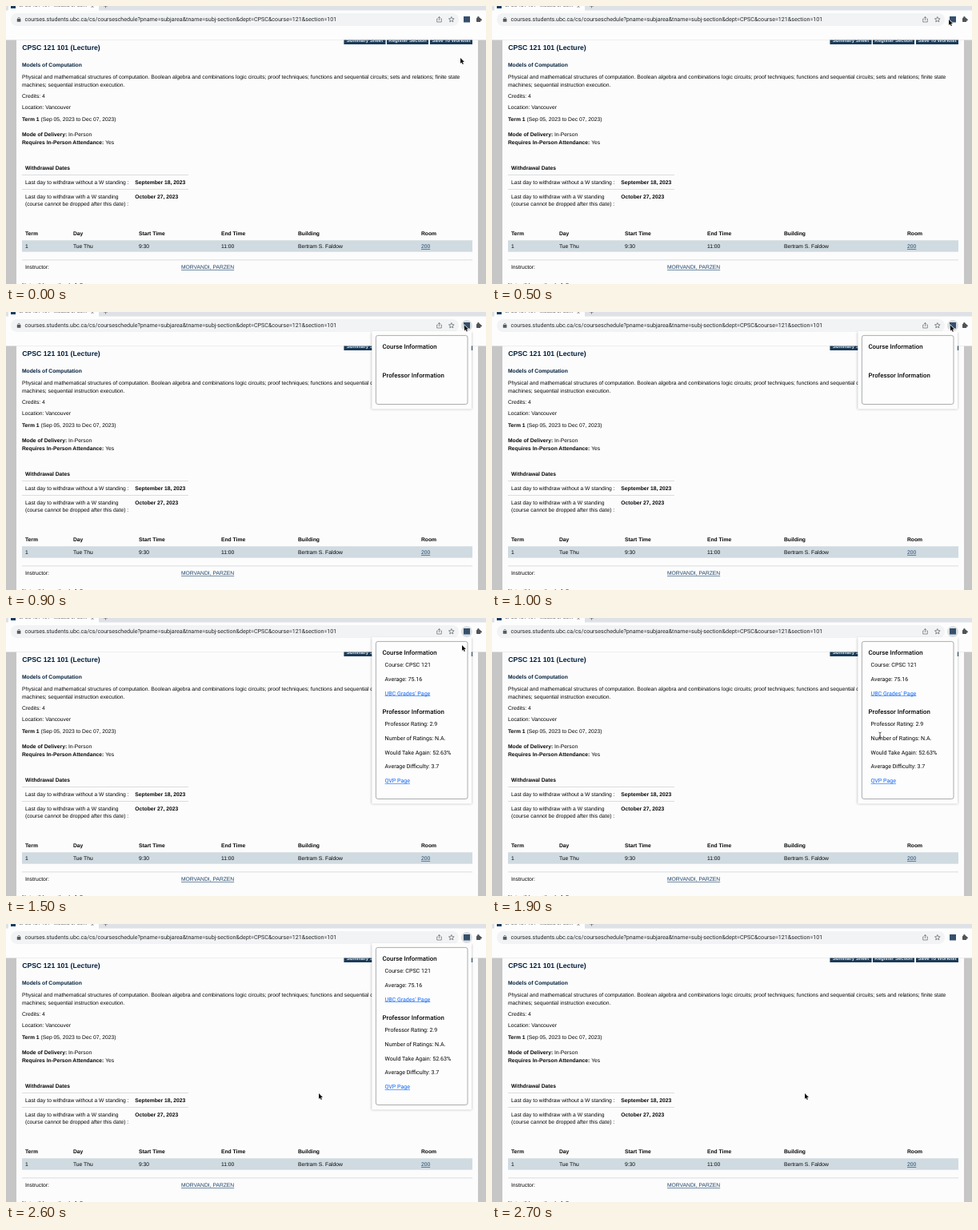
Write an HTML page with a canvas that moves like this. It is 600x348 px and loops after 2.8 s.

```html
<!DOCTYPE html>
<html lang="en">
<head>
<meta charset="utf-8">
<title>Course page helper</title>
<style>
  html, body { margin: 0; width: 100%; height: 100%; overflow: hidden; background: #fff; }
  canvas { display: block; width: 600px; height: 348px; }
</style>
</head>
<body>
<canvas id="stage" width="600" height="348"></canvas>
<script>
const ctx = document.getElementById('stage').getContext('2d');
ctx.textRendering = 'geometricPrecision';

const LOOP = 2800, STEP = 100;
const OPEN = 800, LOADED = 1100, CLOSED = 2700;
const PAGE = '"Liberation Sans", Arial, sans-serif';
const UI = 'Roboto, sans-serif';
const BODY = `6.74px ${PAGE}`;
const BOLD = `bold ${BODY}`;
const INK = '#050607', NAVY = '#001f3d', LINK = '#1b436a';

// time, x, y of the pointer tip
const path = [
  [0, 568, 65], [100, 568, 64], [300, 570, 38], [500, 571, 17], [600, 573, 16],
  [1300, 573, 17], [1500, 570, 34], [1700, 525, 105], [1800, 497, 137],
  [1900, 485, 147], [2300, 472, 172], [2400, 472, 172], [2600, 391, 212], [2800, 391, 212]
];

function rect(x, y, w, h, color) {
  ctx.fillStyle = color;
  ctx.fillRect(x, y, w, h);
}

function round(x, y, w, h, r, fill, stroke) {
  ctx.beginPath();
  ctx.roundRect(x, y, w, h, r);
  if (fill) { ctx.fillStyle = fill; ctx.fill(); }
  if (stroke) { ctx.strokeStyle = stroke; ctx.stroke(); }
}

function text(str, x, y, font = BODY, color = INK) {
  ctx.font = font;
  ctx.fillStyle = color;
  ctx.fillText(str, x, y);
  return x + ctx.measureText(str).width;
}

function link(str, x, y, font, color) {
  const end = text(str, x, y, font, color);
  rect(x, y + 0.8, end - x, 0.6, color);
}

function labelled(label, value, x, y) {
  text(value, text(label + ' ', x, y, BOLD), y);
}

function stroke(points, color, width, closed) {
  ctx.beginPath();
  points.forEach(([x, y]) => ctx.lineTo(x, y));
  if (closed) ctx.closePath();
  ctx.strokeStyle = color;
  ctx.lineWidth = width;
  ctx.stroke();
}

function drawBrowser(open) {
  rect(0, 0, 600, 43, '#fdfdfd');
  rect(116, 0, 484, 5.5, '#dee1e6');
  rect(0, 0, 3, 5.5, '#dee1e6');
  rect(6, 0, 6, 3, '#1c3d60');
  text('CPSC 121 101 - Models of Com', 16, 1.4, `6.1px ${UI}`, '#55595d');
  stroke([[106.5, -1], [109.5, 2]], '#666', 0.7);
  stroke([[109.5, -1], [106.5, 2]], '#666', 0.7);
  stroke([[122, 0], [127, 0]], '#666', 0.8);
  stroke([[124.5, -2], [124.5, 2.5]], '#666', 0.8);

  round(6, 9, 560, 16, 8, '#f1f3f4');
  round(13.8, 16, 4.6, 3.8, 0.6, '#55595d');
  ctx.beginPath();
  ctx.arc(16.1, 15.8, 1.4, Math.PI, 0);
  ctx.strokeStyle = '#55595d';
  ctx.lineWidth = 0.7;
  ctx.stroke();
  text('courses.students.ubc.ca/cs/courseschedule?pname=subjarea&tname=subj-section&dept=CPSC&course=121&section=101',
    23.5, 19.4, `7.125px ${UI}`, '#222528');

  stroke([[540, 16], [538.7, 16], [538.7, 20], [544.3, 20], [544.3, 16], [543, 16]], '#66696d', 0.7);
  stroke([[541.5, 18], [541.5, 13.5]], '#66696d', 0.7);
  stroke([[540, 15], [541.5, 13.4], [543, 15]], '#66696d', 0.7);
  const star = Array.from({ length: 10 }, (_, i) => {
    const a = i * Math.PI / 5 - Math.PI / 2, r = i % 2 ? 1.6 : 3.5;
    return [556.8 + r * Math.cos(a), 17 + r * Math.sin(a)];
  });
  stroke(star, '#55595d', 0.7, true);

  if (open) round(569, 10, 14, 14, 7, '#dcdee0');
  rect(572, 13, 8, 7.5, '#35506c');
  round(588, 14.8, 5.2, 5.2, 0.7, '#505458');
  for (const [x, y] of [[590.4, 14.3], [593.5, 17.3]]) {
    ctx.beginPath();
    ctx.arc(x, y, 1.2, 0, 7);
    ctx.fill();
  }
}

function drawPage() {
  rect(0, 42.5, 600, 306, '#c6c6c6');
  rect(13, 42.5, 577, 306, '#fcfcfc');

  ctx.save();
  ctx.beginPath();
  ctx.rect(13, 42.5, 577, 6);
  ctx.clip();
  ctx.textAlign = 'center';
  [['Summary Sheet', 422.4, 52.1], ['Register Section', 476, 52], ['Save To Worklist', 530, 53]].forEach(([label, x, w]) => {
    rect(x, 42, w, 6, '#1b3b59');
    ctx.font = `bold 6px ${PAGE}`;
    ctx.fillStyle = '#e8edf1';
    ctx.fillText(label, x + w / 2, 44.5);
  });
  ctx.restore();

  text('CPSC 121 101 (Lecture)', 20.2, 55.3, `bold 8.7px ${PAGE}`, NAVY);
  text('Models of Computation', 20, 76.3, BOLD, NAVY);
  text('Physical and mathematical structures of computation. Boolean algebra and combinations logic circuits; proof techniques; functions and sequential circuits; sets and relations; finite state', 20, 90.8);
  text('machines; sequential instruction execution.', 20, 100.6);
  text('Credits: 4', 20, 114.9);
  text('Location: Vancouver', 20, 129.4);
  labelled('Term 1', '(Sep 05, 2023 to Dec 07, 2023)', 20, 143.7);
  labelled('Mode of Delivery:', 'In-Person', 20, 162.8);
  labelled('Requires In-Person Attendance:', 'Yes', 20, 172.6);

  text('Withdrawal Dates', 24, 205.2, BOLD);
  rect(20, 211, 208, 0.8, '#d2d5d7');
  text('Last day to withdraw without a W standing :', 24, 223);
  text('September 18, 2023', 161.3, 223, BOLD);
  rect(20, 229, 208, 0.8, '#d2d5d7');
  text('Last day to withdraw with a W standing', 24, 240.8);
  text('(course cannot be dropped after this date) :', 24, 250.4);
  text('October 27, 2023', 161.3, 240.8, BOLD);

  rect(20, 293.3, 563, 14.4, '#d0dbe1');
  const columns = [
    ['Term', '1', 24], ['Day', 'Tue Thu', 84], ['Start Time', '9:30', 166],
    ['End Time', '11:00', 269], ['Building', 'Bertram S. Faldow', 365], ['Room', '200', 519]
  ];
  for (const [head, value, x] of columns) {
    text(head, x, 286.8, BOLD);
    if (head === 'Room') link(value, x, 303.2, BODY, LINK);
    else text(value, x, 303.2);
  }
  rect(20, 317.5, 563, 0.8, '#d2d5d7');
  text('Instructor:', 24, 329.2);
  link('MORVANDI, PARZEN', 219, 329.2, BODY, LINK);
  text('Note: this section is full.', 20, 352, BOLD);
}

function drawPopup(loaded) {
  const height = loaded ? 208.5 : 97.5;
  ctx.save();
  ctx.shadowColor = 'rgba(0,0,0,.28)';
  ctx.shadowBlur = 3;
  ctx.shadowOffsetY = 0.5;
  rect(457.3, 24, 124.7, height, '#fdfdfd');
  ctx.restore();
  ctx.lineWidth = 0.8;
  round(462.4, 29.4, 114.6, height - 11.4, 2.5, null, '#96999c');

  const heading = `500 7.85px ${UI}`, row = `7.07px ${UI}`, blue = '#0d66f5';
  text('Course Information', 470.5, 46, heading);
  text('Professor Information', 470.5, loaded ? 120 : 82, heading);
  if (!loaded) return;
  text('Course: CPSC 121', 473.6, 61, row);
  text('Average: 75.16', 473.6, 78.7, row);
  link('UBC Grades\u2019 Page', 473.6, 96.5, row, blue);
  ['Professor Rating: 2.9', 'Number of Ratings: N.A.', 'Would Take Again: 52.63%', 'Average Difficulty: 3.7']
    .forEach((line, i) => text(line, 473.6, 135.2 + i * 17.75, row));
  link('QVP Page', 473.6, 206.3, row, blue);
}

function pointerAt(t) {
  const i = path.findIndex(([time]) => time > t);
  const [t0, x0, y0] = path[i - 1], [t1, x1, y1] = path[i];
  const k = (t - t0) / (t1 - t0);
  return [x0 + (x1 - x0) * k, y0 + (y1 - y0) * k];
}

function drawPointer(t) {
  const [x, y] = pointerAt(t);
  ctx.save();
  ctx.translate(x, y);
  if (t >= 1900 && t < 2300) {
    stroke([[-1.6, -4], [0, -3.2], [1.6, -4]], '#333', 0.8);
    stroke([[0, -3.2], [0, 3.2]], '#333', 0.8);
    stroke([[-1.6, 4], [0, 3.2], [1.6, 4]], '#333', 0.8);
    stroke([[-1, 1], [1, 1]], '#333', 0.7);
  } else {
    stroke([[0, 0], [0, 7], [1.6, 5.6], [2.7, 8.1], [3.9, 7.6], [2.8, 5.1], [5, 5]], '#fff', 1.2, true);
    ctx.fillStyle = '#111';
    ctx.fill();
  }
  ctx.restore();
}

function frame(now) {
  const t = Math.floor((now % LOOP) / STEP) * STEP;
  const open = t >= OPEN && t < CLOSED;
  drawBrowser(open);
  drawPage();
  if (open) drawPopup(t >= LOADED);
  drawPointer(t);
  requestAnimationFrame(frame);
}

requestAnimationFrame(frame);
</script>
</body>
</html>
```
